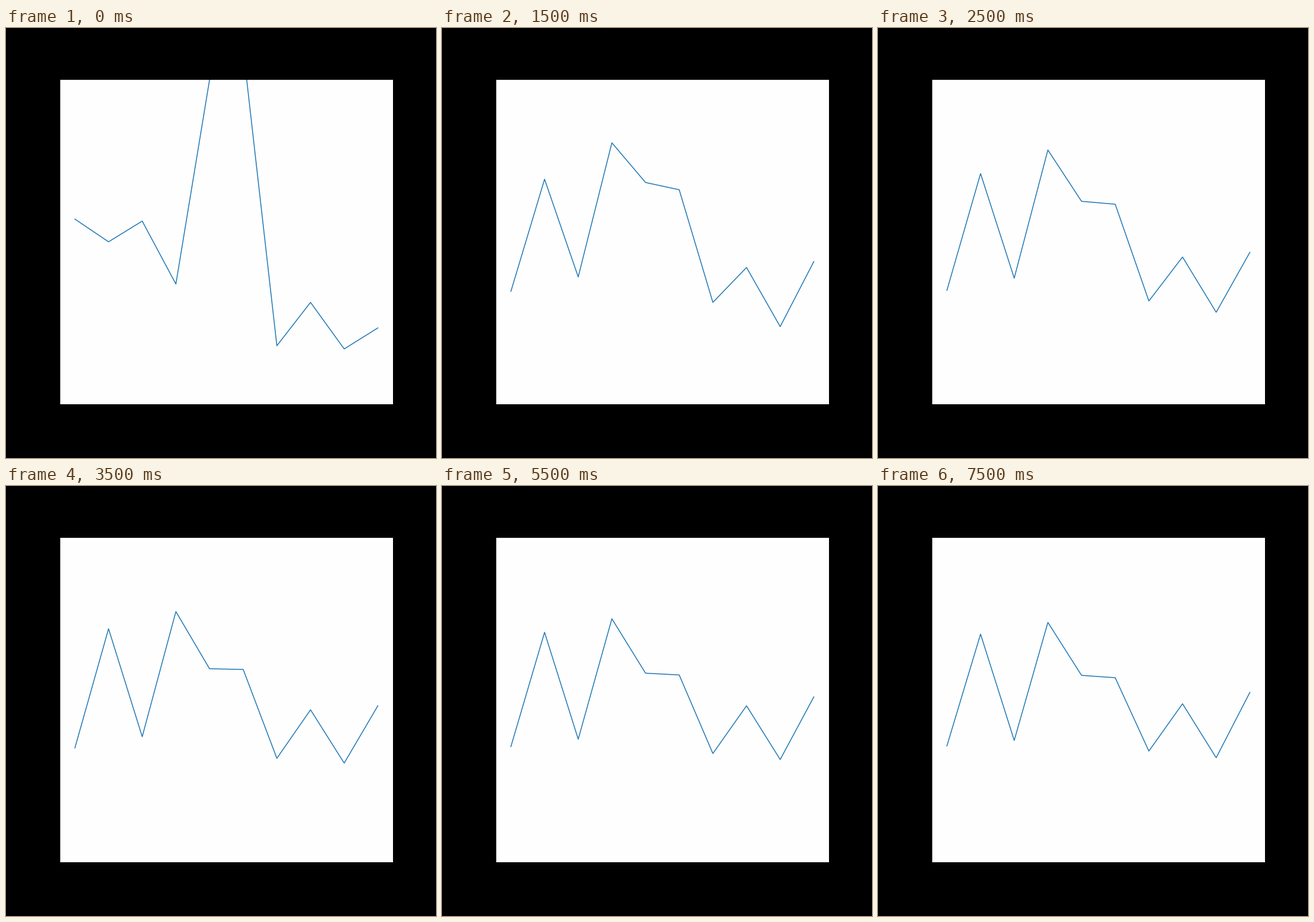
Write a matplotlib script that moves like this. It is 720x720 px and loops after 8 s.

```python
import matplotlib.pyplot as plt
import numpy as np
from matplotlib.animation import FuncAnimation

FRAMES, INTERVAL = 16, 500
TOP, BOTTOM = 86.4, 630
X = np.arange(10)

# Point heights, in pixels from the top, after 1, 4, 8 and 16 samples.
COUNTS = (1, 4, 8, 16)
POSES = np.array([
    [320, 358, 323.3, 428.7, 86.8, 35, 532, 459.4, 537.4, 502.2],
    [441, 253.2, 416.8, 192.2, 258.7, 270.8, 459.4, 401, 500, 391],
    [438.6, 239, 419.8, 210.2, 306, 307.2, 456, 374.7, 464, 368],
    [435.2, 248, 426, 228.4, 317.1, 321, 443.9, 364.6, 455, 345.6],
])


def settle(count):
    """Progress of a running mean: each new sample moves it by less."""
    return 1 - 1 / np.asarray(count)


def heights(i):
    progress = settle(i + 1)
    return [np.interp(progress, settle(COUNTS), track) for track in POSES.T]


fig = plt.figure(figsize=(10, 10), dpi=72, facecolor="black")
ax = fig.add_axes([0.125, 0.125, 0.775, 0.755], facecolor="#fefefe")
ax.set(xlim=(-0.45, 9.45), ylim=(BOTTOM, TOP),
       xticks=X[::2], yticks=np.linspace(BOTTOM, TOP, 9))
ax.tick_params(labelbottom=False, labelleft=False)
line, = ax.plot(X, heights(0), color="#1f77b4", lw=1.5)


def update(i):
    line.set_ydata(heights(i))
    return line,


anim = FuncAnimation(fig, update, frames=FRAMES, interval=INTERVAL,
                     repeat=True, repeat_delay=0)
plt.show()
```
